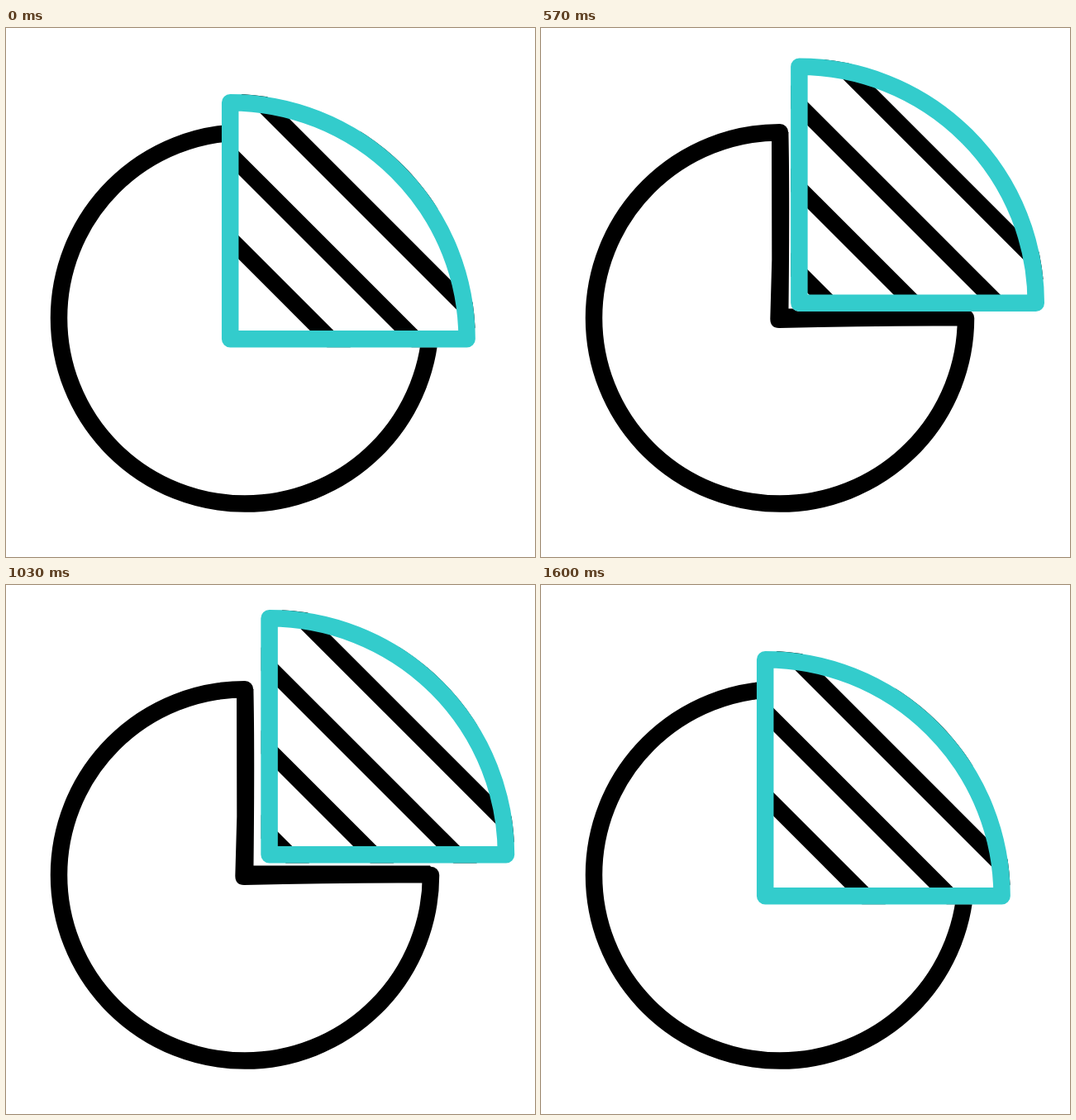
An HTML page for the animation above (1670 ms loop, 640 by 640 pixels).

```html
<!DOCTYPE html>
<html lang="en">
<head>
<meta charset="utf-8">
<title>Pie chart</title>
<style>
  html, body { margin: 0; width: 100%; height: 100%; overflow: hidden; background: #fff; }
  svg { display: block; width: 100vw; height: 100vh; }
  .line { fill: none; stroke-width: 20.5; stroke-linecap: round; stroke-linejoin: round; }
</style>
</head>
<body>
<svg viewBox="0 0 640 640">
  <defs>
    <clipPath id="wedge">
      <path d="M261.1 90A10.1 10.1 0 0 1 271.2 79.8A296.8 296.8 0 0 1 567.9 376.2A10.1 10.1 0 0 1 557.8 386.3H271.2A10.1 10.1 0 0 1 261.1 376.2Z"/>
    </clipPath>
  </defs>
  <path class="line" stroke="#000" d="M514 351A225 224.7 0 1 1 289 126.2"/>
  <path d="M279 130L279.3 280L277.3 352Q277.5 363 288 363Q400 360 505 360.5L514 351V341L513 339.5H299.5Q301 200 299.4 126Z"/>
  <g id="slice">
    <g clip-path="url(#wedge)">
      <rect x="250" y="70" width="330" height="330" fill="#fff"/>
      <g id="stripes" stroke="#000" stroke-width="20.2"></g>
    </g>
    <path class="line" stroke="#33cccc" d="M271.2 376.2V90.2A286.4 286 0 0 1 557.6 376.2Z"/>
  </g>
</svg>
<script>
const LOOP = 1670, STEP = 100 / 3, HALF = 12, LAST = 48;
const SHIFT = { x: 64.2, y: -67.6 };
const slice = document.getElementById('slice');
const stripes = document.getElementById('stripes');

// The stripes stay still on the stage while the slice moves over them.
for (const c of [16, 118.3, 218.8, 317.7, 414.5]) {
  const line = document.createElementNS('http://www.w3.org/2000/svg', 'line');
  const ends = { x1: c - 50, y1: -50, x2: c + 500, y2: 500 };
  for (const k in ends) line.setAttribute(k, ends[k]);
  stripes.append(line);
}

// Cubic easing with flat ends, solved by bisection.
function ease(x, a, b) {
  let lo = 0, hi = 1;
  for (let i = 0; i < 24; i++) {
    const s = (lo + hi) / 2, r = 1 - s;
    if (3 * a * s * r * r + 3 * b * s * s * r + s * s * s < x) lo = s;
    else hi = s;
  }
  return lo * lo * (3 - 2 * lo);
}

function offset(step) {
  const p = step % (2 * HALF);
  return p < HALF
    ? ease(p / HALF, 0.42, 0.44)
    : 1 - ease(p / HALF - 1, 0.42, 0.58);
}

function draw() {
  const t = performance.now() % LOOP;
  const k = offset(Math.min(LAST, Math.floor((t + 5) / STEP)));
  const x = SHIFT.x * k, y = SHIFT.y * k;
  slice.setAttribute('transform', `translate(${x} ${y})`);
  stripes.setAttribute('transform', `translate(${-x} ${-y})`);
  requestAnimationFrame(draw);
}
draw();
</script>
</body>
</html>
```
